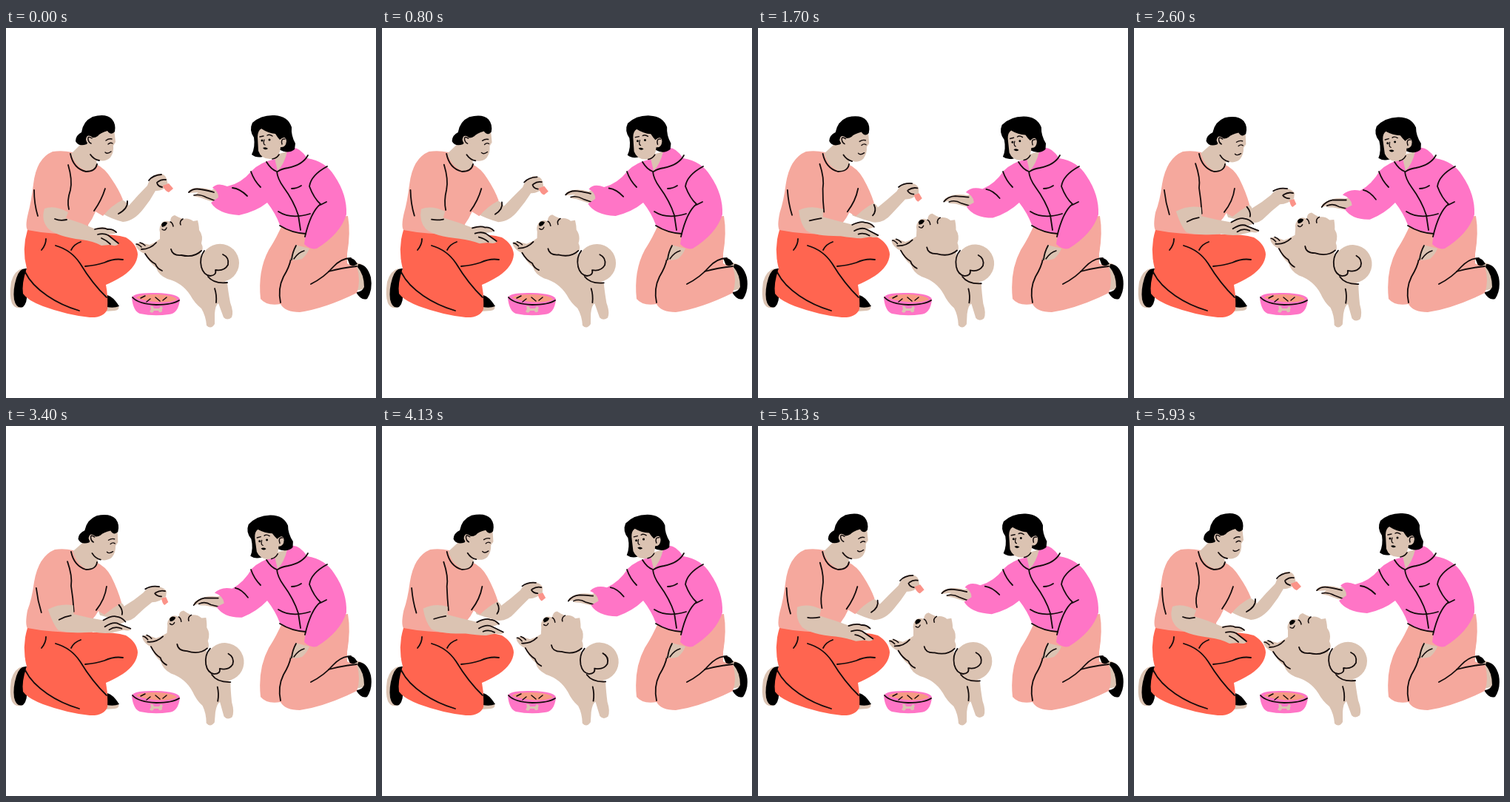
Animation, 500 px wide and 500 px high, one loop 6.01 s. Source, as an HTML page:

```html
<!DOCTYPE html>
<html lang="en">
<head>
<meta charset="utf-8">
<title>Treat time</title>
<style>
html, body { margin: 0; width: 100%; height: 100%; overflow: hidden; background: #fff; }
svg { display: block; width: 100vw; height: 100vh; }
path { stroke-linecap: round; stroke-linejoin: round; }
</style>
</head>
<body>
<svg id="stage" viewBox="0 0 500 500"></svg>
<script>
const LOOP = 6010;
const SKIN = '#dbc3b2', INK = '#000', SALMON = '#f5a89d', RED = '#ff6550', PINK = '#ff75c6';
const stage = document.getElementById('stage');
const morphs = [], swings = [];

function add(parent, tag, attrs) {
  const el = document.createElementNS('http://www.w3.org/2000/svg', tag);
  for (const k in attrs) el.setAttribute(k, attrs[k]);
  parent.appendChild(el);
  return el;
}

// A second path of the same structure makes the part move between the two poses.
function morph(el, a, b) {
  if (b) morphs.push({ el, a, to: b.match(/-?\d+(\.\d+)?/g).map(Number) });
}
function fill(parent, color, a, b) {
  morph(add(parent, 'path', { d: a, fill: color }), a, b);
}
function line(parent, a, b, width = 1.8) {
  morph(add(parent, 'path', { d: a, fill: 'none', stroke: '#140c0c', 'stroke-width': width }), a, b);
}
function swing(angle, x, y, dx = 0, dy = 0) {
  const el = add(stage, 'g', {});
  swings.push({ el, angle, x, y, dx, dy });
  return el;
}
const group = () => add(stage, 'g', {});

function manLegs() {
  const g = group();
  fill(g, SKIN, 'M22 325Q11 328 7 343Q4 362 8 372Q13 381 22 377L27 366L24 340Z');
  fill(g, INK, 'M28 325Q18 324 14 338Q9 354 11 367Q14 380 23 377Q29 371 28 360L24 345Z');
  fill(g, SKIN, 'M135 371L152 375Q154 381 147 382L134 383Z');
  fill(g, INK, 'M137 361Q145 363 153 376Q146 379 136 377Z');
  fill(g, RED, 'M29 273Q65 280 112 279Q144 278 162 283Q177 292 178 306Q177 322 158 335Q145 343 135 347Q138 362 137 380Q132 392 113 391Q83 388 50 376Q29 368 23 359Q21 345 28 325Q21 299 29 273Z');
  line(g, 'M54 285Q54 293 48 300');
  line(g, 'M67 294Q88 300 100 318Q117 346 136 364');
  line(g, 'M88 300Q92 292 101 289');
  line(g, 'M107 322Q121 321 133 317Q146 311 158 313');
  line(g, 'M26 330Q34 347 56 362Q75 375 99 382');
}

function manBody() {
  const g = group();
  fill(g, SKIN,
    'M127 245L155 231Q163 235 166 240Q178 226 191 213Q194 202 205 197Q215 196 217 204L219 212Q211 221 202 220Q195 233 186 244Q173 261 158 262Q142 258 129 250Z',
    'M125 251L154 238Q159 241 159 244Q173 236 185 226Q190 219 203 217Q214 219 217 224L216 231Q207 239 197 239Q186 247 177 256Q168 266 154 263Q143 260 127 256Z');
  fill(g, SALMON,
    'M63 167Q76 165 90 168Q95 188 122 184Q134 190 142 203Q153 219 158 232Q142 240 131 254L121 248Q117 258 111 266L113 280Q75 286 30 274Q25 270 30 250Q34 235 37 211Q41 176 63 167Z',
    'M66 167Q78 165 91 168Q95 188 122 184Q135 190 142 203Q151 221 156 239Q144 246 133 255L125 250Q121 257 117 261L117 279Q75 286 30 275Q25 270 29 249Q35 234 38 211Q44 176 66 167Z');
  line(g, 'M84 185Q90 205 87 219Q82 234 85 245', 'M83 183Q90 203 88 216Q91 232 92 251');
  line(g, 'M38 219Q38 238 43 254', 'M41 219Q43 236 48 252');
  line(g, 'M134 217Q129 233 119 247', 'M136 217Q134 234 122 249');
  line(g, 'M164 234Q165 244 152 251', 'M152 242Q158 249 157 255');
  line(g, 'M193 206Q198 199 210 198', 'M188 221Q196 216 207 218');
  line(g, 'M205 208Q210 204 216 205', 'M202 226Q209 222 215 224');
  line(g, 'M204 209Q205 214 211 215', 'M201 227Q204 231 210 231');
  fill(g, '#fb9389', 'M212 213L220 210L226 217L220 222Q215 221 212 213Z', 'M210 234L216 232L219 239L214 243Q211 241 210 234Z');
}

function manForearm() {
  const g = group();
  fill(g, SKIN,
    'M52 244Q66 239 84 249L81 257Q101 263 119 271Q132 266 149 275L147 278L135 279L153 291Q150 296 140 293L129 294Q118 288 102 286Q69 282 57 271Q47 260 52 244Z',
    'M57 248Q73 239 91 242L92 254Q111 259 132 262Q143 255 157 258L162 264L153 268L170 273Q168 277 160 275L146 278Q136 281 118 278Q84 281 71 276Q64 268 57 248Z');
  line(g, 'M66 258Q73 261 82 259', 'M72 262Q80 257 88 256');
  line(g, 'M120 272Q132 269 137 272Q144 271 149 276', 'M132 262Q144 255 150 257Q157 258 162 264');
  line(g, 'M124 279Q132 277 138 280L152 291', 'M134 271Q146 263 153 267L169 273');
  line(g, 'M129 284Q136 287 141 292', 'M140 275Q148 269 157 273');
}

function manHead() {
  const g = swing(3.8, 105, 190, 1.2, 0.3);
  fill(g, SKIN, 'M102 156L88 170Q94 188 109 193Q120 192 123 184L122 178Q134 182 141 175Q146 168 145 159L148 154L146 136L120 134Z');
  fill(g, INK, 'M94 153Q94 145 102 141Q104 126 117 120Q135 115 143 123Q149 130 147 140Q142 146 137 139Q127 142 124 146Q120 149 115 148L109 157Q98 161 94 153Z');
  fill(g, SKIN, 'M117 148Q109 142 108 151Q110 159 117 157Z');
  line(g, 'M116 149Q110 145 111 151Q112 155 115 156', 0, 1.5);
  line(g, 'M135 152Q139 149 143 150', 0, 1.4);
  line(g, 'M138 157Q141 154 144 156', 0, 1.4);
  line(g, 'M134 168Q137 171 142 167', 0, 1.4);
  line(g, 'M114 171Q119 178 126 179');
  line(group(), 'M87 170Q91 190 108 194Q121 194 123 184', 'M88 170Q92 189 108 194Q122 194 123 184');
}

function bowl() {
  const g = group();
  fill(g, PINK, 'M170 365Q171 357 203 358Q234 359 235 367Q233 386 220 387Q200 390 181 386Q172 383 170 365Z');
  fill(g, '#f69b83', 'M176 365Q178 360 203 360Q228 361 231 367Q212 375 176 365Z');
  line(g, 'M171 364Q179 373 203 374Q225 374 234 368');
  line(g, 'M182 365L188 362M190 370L195 366M202 364L208 369M212 368L217 364', 0, 1.5);
  fill(g, SKIN, 'M195 376Q199 375 200 379L207 379Q209 374 212 378Q210 380 211 383Q207 386 206 382L200 382Q198 387 194 383Q197 380 195 376Z');
}

function dog() {
  const g = swing(4.9, 276, 398);
  add(g, 'circle', { cx: 289.2, cy: 317.5, r: 25.8, fill: SKIN });
  fill(g, SKIN, 'M175 293Q178 288 186 291L194 293Q202 290 208 285L208 276Q206 269 211 263Q216 259 222 262Q222 254 228 253Q233 256 239 258Q247 256 253 261L259 260Q261 268 261 273Q267 281 264 291Q268 299 263 304Q265 318 276 329Q289 340 299 344Q300 355 303 371Q308 384 305 391Q299 396 294 391L287 372Q283 374 282 386L282 400Q277 408 271 402Q270 389 264 379Q255 372 249 361Q238 344 218 339Q206 334 203 324Q193 317 189 306Q177 301 175 293Z');
  line(g, 'M176 292Q179 292 183 296', 0, 1.6);
  line(g, 'M181 290Q185 291 188 294', 0, 1.6);
  line(g, 'M183 299Q195 299 203 290');
  line(g, 'M188 305Q194 315 202 319Q204 325 211 328');
  fill(g, INK, 'M210 266Q212 260 218 263Q217 268 211 269Z');
  line(g, 'M211 272Q215 275 217 270', 0, 1.4);
  line(g, 'M222 262Q225 263 226 268', 0, 1.5);
  line(g, 'M239 258Q234 261 236 266', 0, 1.5);
  line(g, 'M223 299Q225 308 237 307Q254 311 264 301');
  line(g, 'M268 301Q261 310 264 323Q267 334 276 335Q285 334 283 327Q295 329 300 320Q302 310 293 306');
  line(g, 'M273 336Q281 346 299 344');
  line(g, 'M282 352Q285 361 284 371');
}

function womanLegs() {
  const g = group();
  fill(g, SKIN, 'M462 313L480 319Q491 328 488 352L472 355Z');
  fill(g, INK, 'M476 319Q488 319 493 337Q496 354 488 366Q480 369 473 357Q481 357 484 350Q484 333 475 323Z');
  fill(g, INK, 'M461 311Q470 309 475 319L466 323Z');
  fill(g, SALMON, 'M374 264Q366 283 355 300Q340 328 344 366Q352 376 371 373Q377 384 397 384Q431 379 474 358Q480 342 474 322Q466 322 461 318L461 305Q466 277 462 254Z');
  line(g, 'M385 312Q383 323 375 336Q367 352 371 371');
  line(g, 'M466 311Q453 311 442 323Q430 337 412 346');
  line(g, 'M436 329Q454 324 474 322');
  fill(g, SKIN, 'M391 293L410 298Q407 306 400 312Q391 315 384 313Z');
  line(g, 'M392 294Q387 303 386 313');
  line(g, 'M403 301Q395 303 389 312', 0, 1.5);
}

function womanBody() {
  const g = group();
  fill(g, SKIN,
    'M289 213L278 219Q264 214 252 217Q246 219 247 223L260 222L253 227L262 229L276 234L290 235Z',
    'M296 228L286 231Q271 229 259 236Q253 239 254 243L266 240L260 243L270 243L284 246L296 248Z');
  line(g, 'M247 222Q253 216 263 218Q275 220 281 222', 'M254 243Q259 235 269 233Q280 233 287 233');
  line(g, 'M254 226Q262 224 271 229L284 234', 'M261 241Q269 237 277 242L289 245', 1.6);
  fill(g, PINK,
    'M364 177Q344 181 332 193Q318 210 299 214Q285 208 279 216Q287 220 287 229L277 236Q286 251 315 253Q338 248 353 236Q364 250 370 266Q385 277 405 278L403 292Q411 300 420 298Q452 278 460 252Q461 225 444 200Q432 180 407 176Q396 160 386 162Z',
    'M364 177Q344 181 332 193Q322 211 306 220Q291 217 282 226Q294 230 295 240L285 245Q295 260 319 259Q339 251 353 236Q364 250 370 266Q385 277 405 278L403 292Q411 300 420 298Q452 278 460 252Q461 225 444 200Q432 180 407 176Q396 160 386 162Z');
  fill(g, SKIN, 'M362 172L367 193Q376 184 380 167Z');
  line(g, 'M408 172Q401 185 381 189Q373 190 367 194');
  line(g, 'M352 181Q358 191 366 194Q367 204 375 215Q389 234 395 253L398 273');
  line(g, 'M331 194Q335 206 344 215');
  line(g, 'M306 216Q316 217 326 227', 'M310 219Q319 221 327 232');
  line(g, 'M386 217Q393 217 399 213');
  line(g, 'M368 248Q385 259 411 251');
  line(g, 'M434 187Q412 199 410 214Q416 230 425 238Q412 248 404 282');
  line(g, 'M370 267Q386 277 405 278');
  line(g, 'M425 239L433 235');
}

function womanHead() {
  const g = swing(-5, 372, 187, -0.5, 1.5);
  fill(g, INK, 'M332 171Q337 161 335 148Q328 138 333 128Q345 117 363 118Q381 119 386 134Q385 145 391 156L390 164Q381 171 369 164L347 174Q338 176 332 171Z');
  fill(g, SKIN, 'M340 147Q340 139 345 136Q354 142 364 143Q367 148 370 151Q378 144 379 153Q378 162 371 161Q370 175 359 177Q345 178 341 166Z');
  line(g, 'M377 150Q371 149 373 157', 0, 1.5);
  line(g, 'M343 147L348 146M353 145Q356 143 360 146', 0, 1.4);
  for (const [x, y] of [[346, 152], [356, 151]]) add(g, 'circle', { cx: x, cy: y, r: 1.5, fill: INK });
  line(g, 'M349 151Q347 157 350 158', 0, 1.3);
  fill(g, INK, 'M347 162Q351 160 354 163Q350 166 347 162Z');
  line(g, 'M360 177Q366 176 369 171', 0, 1.6);
}

manBody();
manLegs();
manForearm();
manHead();
bowl();
womanLegs();
womanBody();
womanHead();
dog();

function pose(p) {
  for (const { el, a, to } of morphs) {
    let i = 0;
    el.setAttribute('d', a.replace(/-?\d+(\.\d+)?/g, n => (+n + (to[i++] - n) * p).toFixed(2)));
  }
  for (const { el, angle, x, y, dx, dy } of swings) {
    el.setAttribute('transform', `translate(${dx * p} ${dy * p}) rotate(${angle * p} ${x} ${y})`);
  }
}

// Pictures are held for 30 and 70 ms in turn.
function hold(t) {
  const beat = Math.min(Math.floor(t / 100) * 100, 5900);
  return t - beat < 30 ? beat : beat + 30;
}

const start = performance.now();
function tick() {
  const t = hold((performance.now() - start) % LOOP);
  pose((1 - Math.cos(2 * Math.PI * t / LOOP)) / 2);
  requestAnimationFrame(tick);
}
tick();
</script>
</body>
</html>
```
